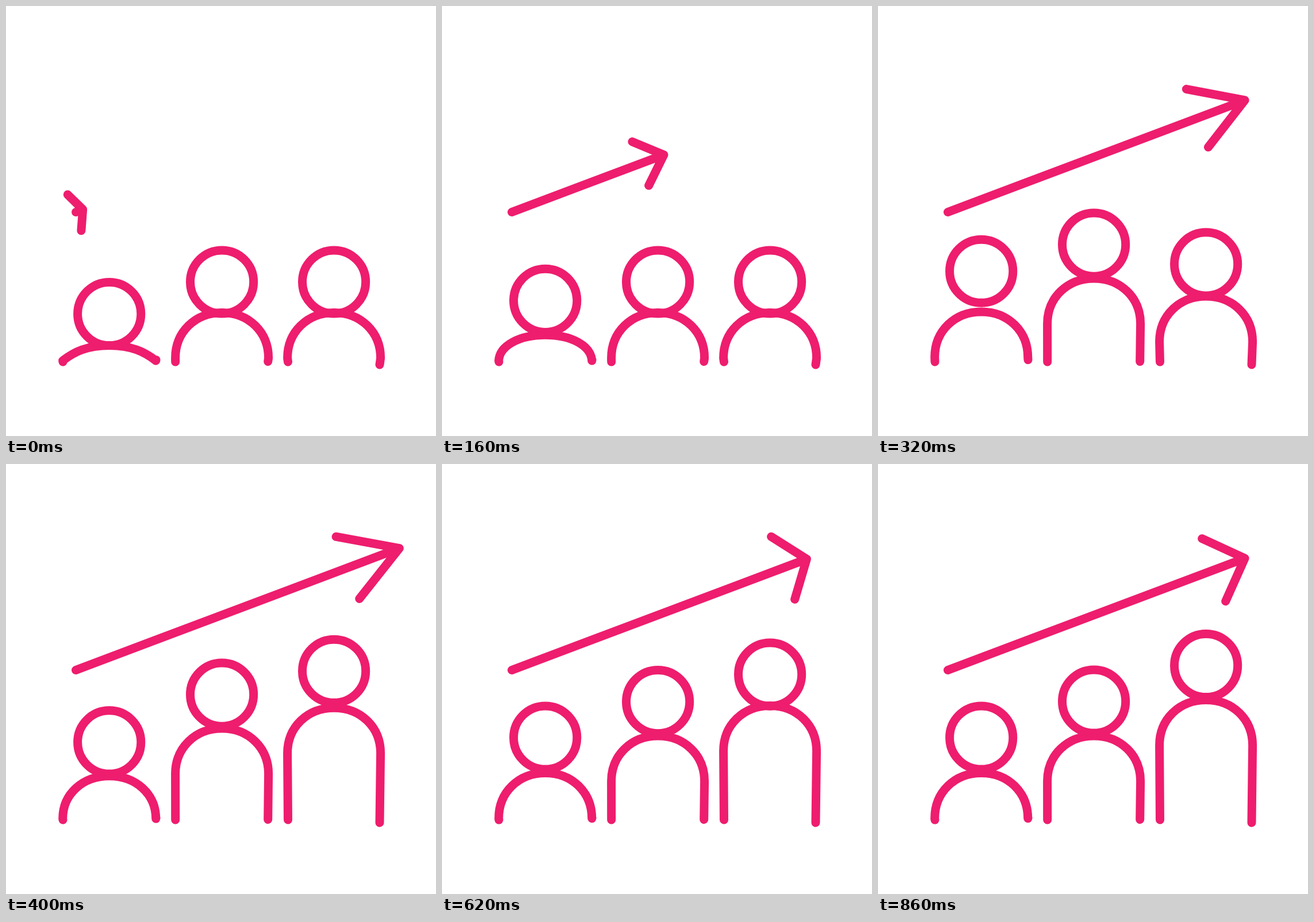
Write an HTML page that moves like this. It is 748 px wide and 748 px high and loops after 3560 ms.

```html
<!DOCTYPE html>
<html lang="en">
<head>
<meta charset="utf-8">
<title>Growing team</title>
<style>
  html, body { margin: 0; width: 100%; height: 100%; overflow: hidden; background: #fff; }
  svg { display: block; width: 100%; height: 100%; }
  path, circle { fill: none; stroke: #ee1d6e; stroke-width: 15; stroke-linecap: round; stroke-linejoin: round; }
</style>
</head>
<body>
<svg viewBox="0 0 748 748"></svg>
<script>
const LOOP = 3560, STEP = 20, END = 860;

const linear = u => u;
const easeOut = u => Math.sin(u * Math.PI / 2);
const easeInOut = u => (1 - Math.cos(u * Math.PI)) / 2;

// Moves through [time, value, easing] keys, holding the first and last value.
function motion(...keys) {
  return t => {
    const next = keys.findIndex(key => key[0] > t);
    if (next < 0) return keys[keys.length - 1][1];
    if (next === 0) return keys[0][1];
    const [t0, v0] = keys[next - 1], [t1, v1, ease = easeInOut] = keys[next];
    return v0 + (v1 - v0) * ease((t - t0) / (t1 - t0));
  };
}

// Shoots past the rest level, falls short of it, then settles; both as parts of the travel.
function bounce(from, rest, [start, peak, dip, settle], over, under) {
  const travel = from - rest;
  return motion([start, from], [peak, rest - over * travel], [dip, rest + under * travel], [settle, rest]);
}

function person(x, left, right, rightY, times, head, body) {
  return {
    x, left, right, rightY,
    headY: bounce(head.from, head.rest, times, head.over, head.under),
    top: bounce(body.from, body.rest, times, body.over, body.under)
  };
}
const people = [
  person(179.7, 99, 261, 615.5, [70, 310, 400, 560],
    { from: 535.5, rest: 476, over: 0.26, under: 0.134 },
    { from: 590.5, rest: 537.5, over: 0.11, under: 0.1 }),
  person(375.6, 294.7, 455.7, 618.5, [180, 380, 480, 640],
    { from: 480, rest: 413, over: 0.22, under: 0.22 },
    { from: 533.5, rest: 473, over: 0.24, under: 0.035 }),
  person(570.6, 490.5, 650, 624, [260, 460, 620, 760],
    { from: 480, rest: 350.5, over: 0.165, under: 0.12 },
    { from: 533.5, rest: 410.5, over: 0.12, under: 0.081 })
];

const shaft = motion([0, 13], [320, 552, linear], [440, 609, easeOut], [620, 548], [760, 552]);
const barbBack = motion([0, 15.6], [400, 96], [620, 44], [760, 57.6]);
const barbSide = motion([0, 33.5], [440, 58.2]);
const ANGLE = Math.atan2(194.5, 516.5);

const svg = document.querySelector("svg");
function add(name, attrs) {
  const node = svg.appendChild(document.createElementNS(svg.namespaceURI, name));
  for (const key in attrs) node.setAttribute(key, attrs[key]);
  return node;
}
const arrow = add("path");
for (const p of people) {
  p.body = add("path");
  p.head = add("circle", { cx: p.x, r: 55.1 });
}

function drawPerson(p, t) {
  const half = 81, round = 0.575, top = p.top(t);
  const shoulder = Math.min(top + 79, 617), height = shoulder - top;
  const splay = Math.max(0, 46 - height);
  const bend = shoulder - height * round;
  const near = half * round - splay * 0.4;
  p.head.setAttribute("cy", p.headY(t));
  p.body.setAttribute("d",
    `M${p.left} 619L${p.x - half} ${shoulder}` +
    `C${p.x - half + splay} ${bend} ${p.x - near} ${top} ${p.x} ${top}` +
    `C${p.x + near} ${top} ${p.x + half - splay} ${bend} ${p.x + half} ${shoulder}` +
    `L${p.right} ${p.rightY}`);
}

// Point at a distance along the shaft and sideways from it.
function onArrow(along, side) {
  const c = Math.cos(ANGLE), s = Math.sin(ANGLE);
  return `${121.5 + along * c + side * s} ${358.5 - along * s + side * c}`;
}

function drawArrow(t) {
  const length = shaft(t), back = length - barbBack(t), side = barbSide(t);
  const tip = onArrow(length, 0);
  arrow.setAttribute("d",
    `M${onArrow(0, 0)}L${tip}M${onArrow(back, -side)}L${tip}L${onArrow(back, side)}`);
}

const start = performance.now();
function tick() {
  const now = (performance.now() - start) % LOOP;
  const t = Math.min(END, Math.floor(now / STEP) * STEP);
  drawArrow(t);
  people.forEach(p => drawPerson(p, t));
  requestAnimationFrame(tick);
}
tick();
</script>
</body>
</html>
```
